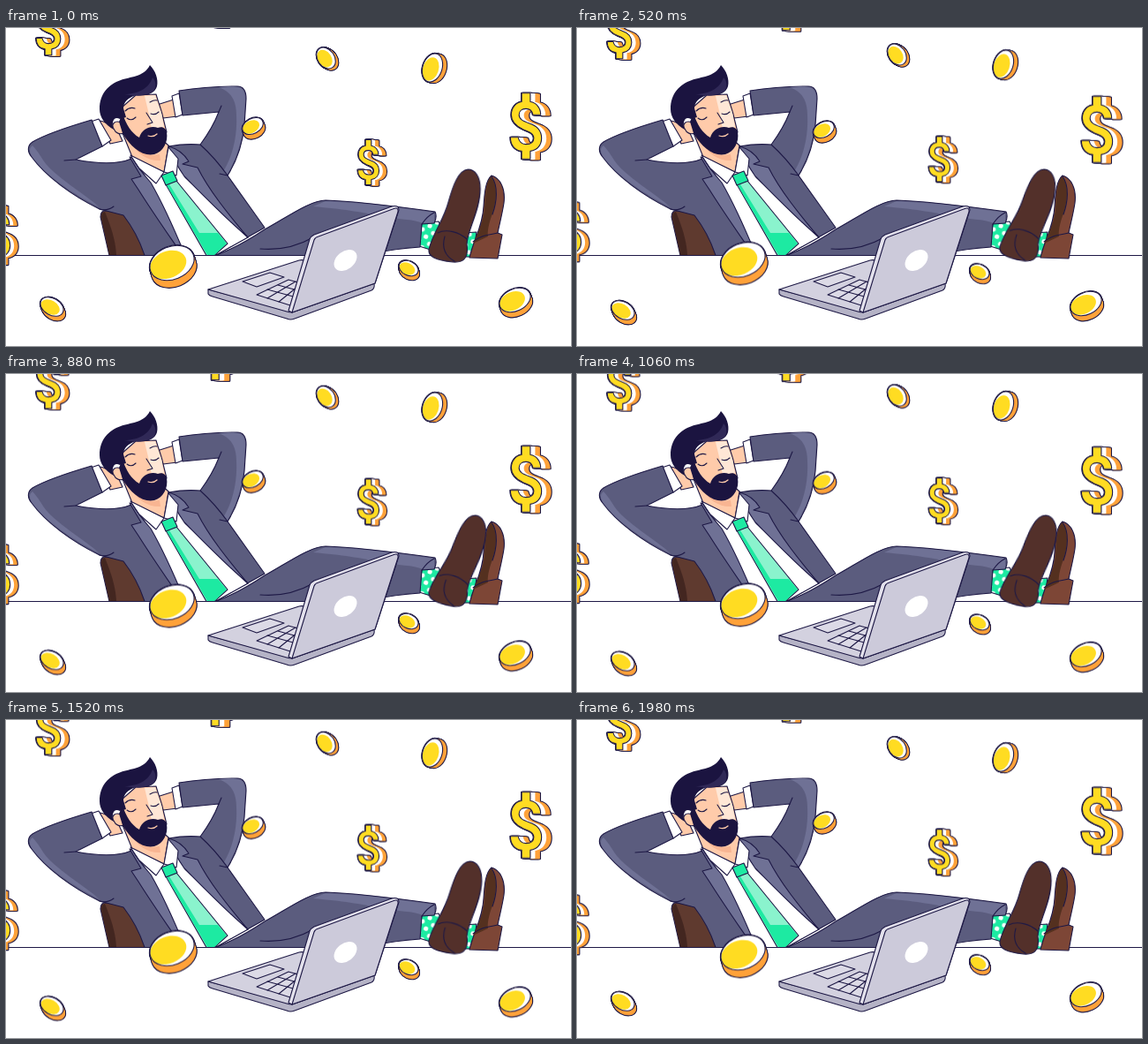
Recreate the animation shown at these times as an HTML page. Size 640x360 px, loop 2 s.

```html
<!DOCTYPE html>
<html lang="en">
<head>
<meta charset="utf-8">
<title>Money rain</title>
<style>
html, body { margin: 0; width: 100%; height: 100%; overflow: hidden; background: #fff; }
svg { display: block; width: 640px; height: 360px; }
.ink { stroke: #1d1845; stroke-width: 1.1; stroke-linejoin: round; stroke-linecap: round; }
.edge { stroke: #1d1845; stroke-width: 2.2; stroke-linejoin: round; }
.line { fill: none; }
.suit { fill: #5b5c7e; }
.glow { fill: #6f7195; }
.skin { fill: #ffcbaa; }
.white { fill: #fff; }
.hair { fill: #1b1440; }
.mint { fill: #1deaa2; }
.yellow { fill: #ffdc22; }
.orange { fill: #ffa23a; }
.bob { animation: bob 2s infinite; }
.shoe { transform-origin: 528px 250px; animation: tap 1s -.12s cubic-bezier(.364, 0, .636, 1) infinite alternate; }
/* A 2.4 s sine swing, cut off at 2 s */
@keyframes bob {
  0% { transform: translateY(0); animation-timing-function: cubic-bezier(.364, 0, .636, 1); }
  60% { transform: translateY(var(--d)); animation-timing-function: cubic-bezier(.333, 0, .667, .396); }
  80% { transform: translateY(calc(var(--d) * .75)); animation-timing-function: linear; }
  100% { transform: translateY(calc(var(--d) * .27)); }
}
@keyframes tap { to { transform: rotate(5.4deg); } }
</style>
</head>
<body>
<svg viewBox="0 0 640 360">
  <defs>
    <path id="dollar" vector-effect="non-scaling-stroke" d="M-5-38H5V-28C12-27 17-21 17-13H8C7-18 4-20 0-20C-5-20-8-17-8-13C-8-8-4-6 4-3C13 0 18 5 18 14C18 22 13 28 5 29V38H-5V29C-13 28-18 22-18 13H-9C-8 18-5 21 0 21C6 21 9 18 9 14C9 9 5 7-3 4C-12 0-17-5-17-13C-17-21-12-27-5-28Z"/>
    <pattern id="dots" width="13" height="13" patternUnits="userSpaceOnUse" patternTransform="translate(470 224) rotate(20)">
      <rect class="mint" width="13" height="13"/>
      <circle class="white" cx="3" cy="3" r="2.6"/>
      <circle class="white" cx="9.5" cy="9.5" r="2.6"/>
    </pattern>
  </defs>

  <path class="ink" style="stroke-width: 1" d="M0 257.500H640"/>

  <g id="chair">
    <path class="ink" fill="#5f3a2f" d="M117 257.500L107 214Q107 206 114 207L135 211L165 257.500Z"/>
    <path fill="#432620" d="M117 257L108 214Q108 208 112 208C119 225 124 240 125 257Z"/>
  </g>

  <g id="hands">
    <path class="ink skin" d="M106 105C114 106 120 111 126 115L132 128L118 131Z"/>
    <path class="ink skin" d="M171 87L190 81L194 100L178 102Z"/>
    <path class="ink white" d="M96 106L105 103L119 127L109 134Z"/>
    <path class="ink white" d="M188 77L196 74L200 98L192 101Z"/>
  </g>

  <g id="torso">
    <path class="ink suit" d="M97 104C70 112 45 120 30 129C24 133 24 140 29 146C45 168 75 190 106 205L133 212C143 225 152 242 157 257.500H237L293 226C280 208 266 188 251 167C261 151 268 132 270 110L272 80C272 71 269 66 262 66C240 66 215 68 196 71L200 99L241 95C236 108 229 120 220 132C208 131 195 132 184 134L142 148C128 154 105 154 79 149L109 134Z"/>
    <path class="glow" d="M241 67C252 66 260 66 263 67C269 68 271 74 271 80L269 110C267 131 260 149 251 165L247 161C257 144 262 122 261 100C261 84 257 73 241 67Z"/>
    <path class="glow" d="M30 133C26 136 26 141 30 146C45 167 76 188 106 203C88 187 55 168 43 151C38 143 34 137 30 133Z"/>
    <path class="ink line" d="M241 95L244 88M79 149L66 150M220 132C230 141 241 153 251 167M106 205C112 207 118 205 122 202M251 167L242 165"/>
    <path class="ink white" d="M143 146L163 176L201 257.500H237L274 237L203 168L184 133Z"/>
    <path class="ink glow" d="M140 146L153 168L142 171L150 183C165 207 184 234 200 257.500H203C192 231 179 201 164 175C156 166 148 156 143 147Z"/>
    <path class="ink glow" d="M184 134C196 137 202 143 207 151L200 154L217 158C230 184 252 211 274 237C248 215 220 186 202 168C195 158 188 145 184 134Z"/>
  </g>

  <g id="head">
    <path class="ink skin" d="M132 119L143 146L179 163L184 133L170 120Z"/>
    <path fill="#f8b592" d="M142 130C149 140 159 146 174 143L175 150C162 151 149 143 142 130Z"/>
    <path class="ink white" d="M141 144L179 163L170 176L151 159ZM179 163L184 135L195 148L193 167Z"/>
    <path class="ink skin" d="M130 91L147 76L170 75C173 86 177 95 178 102L182 118L154 130L134 116Z"/>
    <path fill="#ffe7d6" d="M157 77L169 76C172 87 177 96 177 102L179 112L165 114L162 98Z"/>
    <path class="ink skin" d="M130 107C123 104 119 109 122 114C124 119 129 121 133 119Z"/>
    <path class="hair" d="M106 92C106 74 116 64 130 59C140 55 156 56 163 42C169 48 173 58 171 66C169 74 158 78 147 76C138 79 133 84 133 91L136 101L129 103C122 99 119 107 122 115C112 109 106 101 106 92Z"/>
    <path fill="#302957" d="M134 75C148 75 162 69 166 56C171 61 171 71 163 74C154 77 144 77 134 75Z"/>
    <path class="hair" d="M132 97C136 109 142 119 151 124C154 114 164 110 172 113C178 111 181 114 182 118C184 129 178 140 168 143C155 146 141 135 132 119L128 106Z"/>
    <path class="ink line" d="M137 102Q142 106 147 101M164 97Q169 99 173 95M135 94Q140 89 146 91M163 84Q168 81 171 82M159 96L166 107L160 109"/>
    <path fill="none" stroke="#ffcbaa" stroke-width="1.2" stroke-linecap="round" d="M161 122Q167 124 171 120"/>
  </g>

  <g id="tie">
    <path class="ink" fill="#8af3cd" d="M181 177L193 173L251 244L236 257.500H227Z"/>
    <path class="mint" d="M182 178L185 177L219 232L240 232L250 244L236 257H228Z"/>
    <path class="ink mint" d="M176 167L189 162L194 173L181 178Z"/>
  </g>

  <g id="legs">
    <path class="ink" fill="url(#dots)" d="M471 221L490 219L500 240L484 252L468 247Z"/>
    <path class="ink suit" d="M237 257.500C258 250 275 240 293 228C320 213 345 195 362 195C400 196 450 203 486 208C488 212 487 217 485 221L471 222L469 248C440 250 420 254 405 257.500Z"/>
    <path class="glow" d="M362 196C400 197 450 204 485 209L485 220L472 221C462 216 443 217 425 213C400 208 382 205 348 202Z"/>
    <path class="ink line" d="M288 250C311 252 332 246 348 237M485 209C479 212 475 216 471 222"/>
  </g>

  <g id="shoes">
    <path class="ink" fill="url(#dots)" d="M518 232L533 231L529 259H512Z"/>
    <path class="ink" fill="#7d4636" d="M550 167C560 170 566 182 564 198C562 211 559 222 557 232L562 234L557 261L525 260C529 241 540 225 541 202C542 187 543 173 550 167Z"/>
    <path fill="#54301f" d="M550 168C557 178 556 195 551 210C547 221 545 230 546 236L529 244C536 230 541 219 542 202C543 187 544 173 550 168Z"/>
    <path class="ink line" d="M529 242C538 234 549 234 557 232M550 168C558 179 556 197 551 211"/>
    <g class="shoe">
      <path class="ink" fill="#53302a" d="M523 160C512 161 506 179 501 197C496 217 483 233 479 251C478 259 487 263 506 265C519 266 524 260 522 245C522 230 537 207 537 182C537 168 531 160 523 160Z"/>
      <path class="ink line" d="M489 232C499 227 513 231 522 239M497 236C493 250 499 259 508 264"/>
    </g>
  </g>

  <g id="laptop">
    <path class="ink" fill="#b5b3c6" d="M229 296V301Q230 303 234 304L318 329Q322 331 327 329L414 297Q418 295 417 289L322 321Z"/>
    <path class="ink" fill="#d3d1df" d="M229 296L332 263Q336 262 340 264L417 289L324 322Q321 322 318 321Z"/>
    <path class="ink" fill="#dcdae6" d="M268 287L299 277L315 282L284 293Z"/>
    <path class="ink" fill="#dcdae6" d="M284 302L320 285L338 290L322 314Z"/>
    <path class="ink line" d="M296 306L328 287M309 310L335 289M296 296L329 305M308 291L334 298"/>
    <path class="ink" fill="#e3e1ec" d="M344 239Q345 236 349 234L437 202Q445 200 445 206L418 289L324 322L320 320Z"/>
    <path class="ink" fill="#cccada" d="M349 240Q350 237 354 236L438 205Q445 202 444 208L418 289L324 322Z"/>
    <ellipse class="white" cx="384.500" cy="263" rx="14.500" ry="10" transform="rotate(-38 384.500 263)"/>
  </g>

  <g id="money"></g>
</svg>
<script>
const money = document.getElementById('money');

// Stacks copies of a shape to give it a side, then puts the face on top
function solid(shape, dx, dy, drop, shine, face) {
  const steps = 12;
  const stack = (cls, from, to) => {
    let out = '';
    for (let i = to; i >= from; i--)
      out += `<g class="${cls}" transform="translate(${dx * i / steps} ${dy * i / steps})">${shape}</g>`;
    return out;
  };
  money.insertAdjacentHTML('beforeend', `<g class="bob" style="--d:${drop}px">` +
    stack('edge', 0, steps) + stack('orange', 0, steps) + stack('white', 0, steps * shine) + face + '</g>');
}

function dollar(x, y, size, depth, drop) {
  const shape = `<use href="#dollar" transform="translate(${x} ${y}) scale(${size})"/>`;
  solid(shape, depth, 1, drop, .5, `<g class="ink yellow">${shape}</g>`);
}

function coin(x, y, rx, ry, turn, dx, dy, drop) {
  const at = `transform="translate(${x} ${y}) rotate(${turn})"`;
  const shape = `<ellipse ${at} rx="${rx}" ry="${ry}"/>`;
  // The yellow disc touches the lower left rim and leaves a white crescent
  const size = .82;
  const angle = (155 - turn) * Math.PI / 180;
  const cx = (1 - size) * rx * Math.cos(angle);
  const cy = (1 - size) * ry * Math.sin(angle);
  const disc = `<ellipse class="yellow" ${at} cx="${cx}" cy="${cy}" rx="${rx * size}" ry="${ry * size}"/>`;
  solid(shape, dx, dy, drop, 0,
    `<g class="white">${shape}</g>${disc}<g class="ink line">${shape}</g>`);
}

dollar(589, 111, .98, 11, 9.5);
dollar(410.5, 152, .67, 8.5, -9);
dollar(48, 1.5, .77, 9.5, 10);
dollar(-11, 234, .87, 9, -9.5);
dollar(237, -33.500, .85, 12, 9.5);

coin(362.5, 34, 13, 9.5, 55, 3, 1.5, -10);
coin(483, 45, 16.5, 11, -72, 4.5, 1, -9.5);
coin(279.5, 111, 12.5, 8.5, -28, 2, 5, 10);
coin(188, 266, 26, 18.5, -22, 2.5, 8, -9);
coin(52, 315.5, 14, 9.5, 30, 2, 5, 10);
coin(456, 272, 11.5, 8, 25, 1, 4.5, 9.5);
coin(576.5, 308, 18.5, 12.5, -25, 2, 5.5, 10);
</script>
</body>
</html>
```
